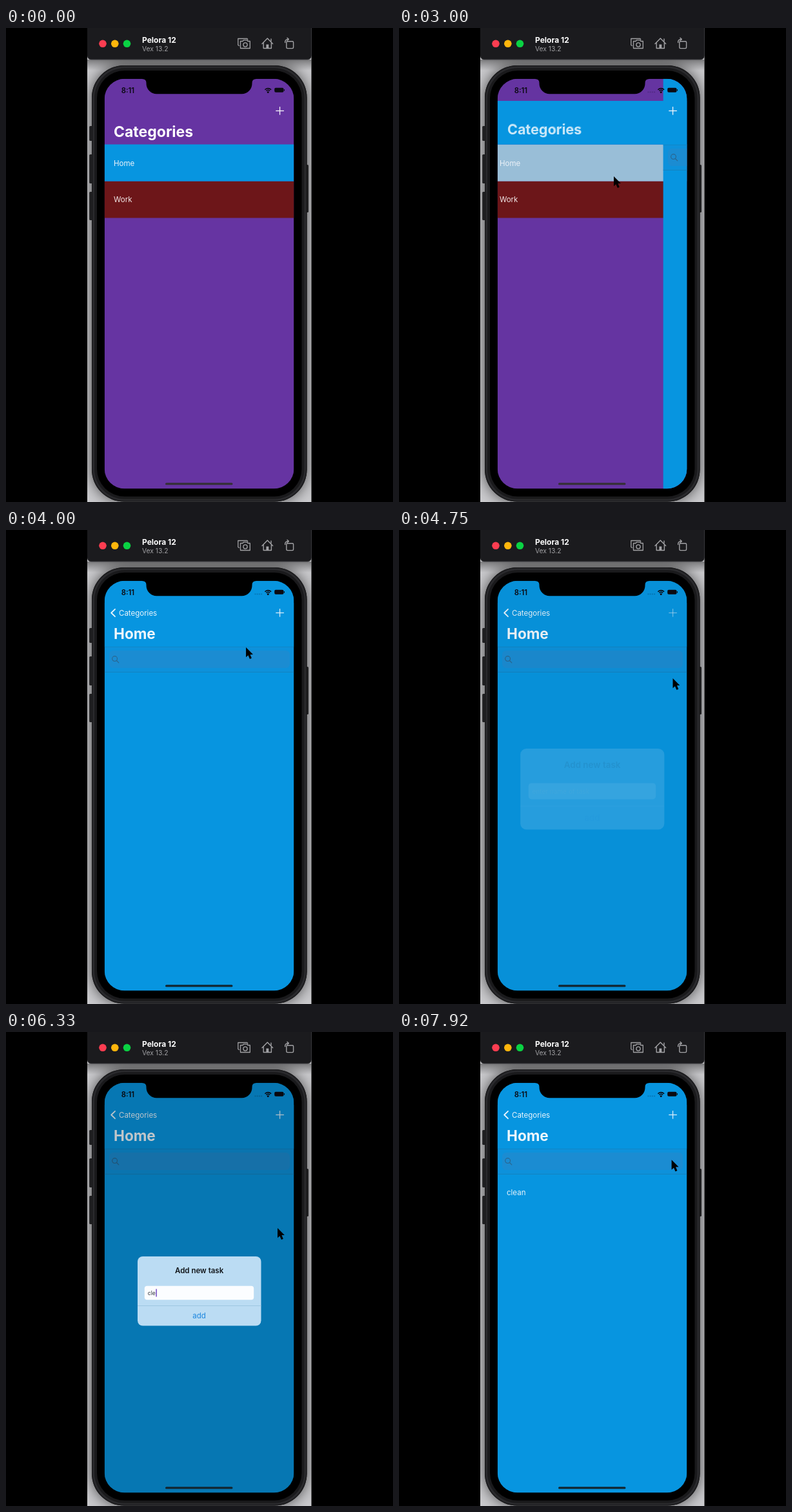
Write an HTML page with a canvas that moves like this. It is 600x735 px and loops after 8000 ms.

```html
<!DOCTYPE html>
<html lang="en">
<head>
<meta charset="utf-8">
<title>Task list demo</title>
<style>
html, body { margin: 0; width: 100%; height: 100%; overflow: hidden; background: #000; }
canvas { display: block; width: 600px; height: 735px; }
</style>
</head>
<body>
<canvas id="stage"></canvas>
<script>
const W = 600, H = 735, LOOP = 8000, STEP = 1000 / 12;
const SCREEN = { x: 152.7, y: 78.8, w: 293.7, h: 635.6, r: 31 };
const PURPLE = '#6634a2', BLUE = '#0795e0', MAROON = '#6d1619', ICON = '#a2a2a5';
const FONT = 'Inter, Roboto, sans-serif';

const canvas = document.getElementById('stage');
const ctx = canvas.getContext('2d');
const dpr = window.devicePixelRatio || 1;
canvas.width = W * dpr;
canvas.height = H * dpr;

// time, x, y of the pointer tip
const POINTER = [
  [1417, 310, 45], [1833, 342, 233], [2167, 434, 250], [2417, 434, 250],
  [2583, 385, 220], [2750, 333, 230], [3667, 333, 230], [4417, 421, 122],
  [4500, 421, 122], [4750, 424.5, 230], [5167, 421, 304], [7667, 421, 304],
  [7750, 430, 314], [7917, 422.6, 198]
];
const TYPING = [[5917, 'c'], [6333, 'cle'], [6500, 'clean']];

const clamp = v => Math.max(0, Math.min(1, v));
const mix = (a, b, p) => a + (b - a) * p;
const smooth = v => { v = clamp(v); return v * v * (3 - 2 * v); };

function box(x, y, w, h, r, fill) {
  ctx.beginPath();
  ctx.roundRect(x, y, w, h, r);
  ctx.fillStyle = fill;
  ctx.fill();
}

function rect(x, y, w, h, fill) {
  ctx.fillStyle = fill;
  ctx.fillRect(x, y, w, h);
}

function disc(x, y, r, fill) {
  ctx.beginPath();
  ctx.arc(x, y, r, 0, Math.PI * 2);
  ctx.fillStyle = fill;
  ctx.fill();
}

function text(str, x, y, size, weight, fill, align = 'left') {
  ctx.font = `${weight} ${size}px ${FONT}`;
  ctx.textAlign = align;
  ctx.fillStyle = fill;
  ctx.fillText(str, x, y);
}

function line(points, color, width, close = false) {
  ctx.beginPath();
  points.forEach(([x, y]) => ctx.lineTo(x, y));
  if (close) ctx.closePath();
  ctx.strokeStyle = color;
  ctx.lineWidth = width;
  ctx.stroke();
}

function faded(alpha, draw) {
  if (alpha <= 0) return;
  ctx.save();
  ctx.globalAlpha *= Math.min(1, alpha);
  draw();
  ctx.restore();
}

function toolbar() {
  box(126, -8, 347.5, 57.5, 6, '#47474a');
  box(126, -8, 347.5, 56.5, 6, '#1b1b1e');
  disc(150, 24.3, 5.8, '#fc3d51');
  disc(168.8, 24.3, 5.8, '#ffb60c');
  disc(187.5, 24.3, 5.8, '#0ad243');
  text('Pelora 12', 211, 22.5, 12, 700, '#fff');
  text('Vex 13.2', 211, 36, 10.3, 400, '#a0a0a3');

  ctx.lineJoin = ctx.lineCap = 'round';
  // screenshot
  line([[361.5, 27.5], [359.8, 26.5], [359.8, 16.5], [374, 16.5], [374.8, 18]], ICON, 1.3);
  line([[363.5, 20.5], [367, 20.5], [368.5, 18.8], [373.5, 18.8], [375, 20.5],
    [378.3, 20.5], [378.3, 31.5], [363.5, 31.5]], ICON, 1.3, true);
  ctx.beginPath();
  ctx.arc(371, 26, 3.1, 0, 7);
  ctx.stroke();
  // home
  line([[397, 24.5], [405.3, 16], [413.6, 24.5]], ICON, 1.4);
  line([[399.2, 23], [399.2, 31.5], [411.4, 31.5], [411.4, 23]], ICON, 1.4);
  line([[411, 20.5], [411, 17]], ICON, 1.4);
  rect(403.4, 25.5, 3.9, 6, ICON);
  // rotate
  ctx.beginPath();
  ctx.roundRect(434.8, 20.8, 10.8, 10.8, 1.5);
  ctx.stroke();
  ctx.beginPath();
  ctx.moveTo(432.6, 22.5);
  ctx.quadraticCurveTo(432.4, 17.4, 438, 17.4);
  ctx.stroke();
  line([[436, 15.2], [438.4, 17.4], [436, 19.6]], ICON, 1.3);
}

function phone() {
  rect(126, 0, 347.5, H, '#cbcbce');
  ctx.save();
  ctx.beginPath();
  ctx.rect(126, 0, 347.5, H);
  ctx.clip();
  ctx.shadowColor = 'rgba(0,0,0,.65)';
  ctx.shadowBlur = 22 * dpr;
  box(133, 58, 333.5, 676.5, 50, '#1c1c1e');
  ctx.restore();
  const shade = ctx.createLinearGradient(0, 49, 0, 66);
  shade.addColorStop(0, 'rgba(0,0,0,.4)');
  shade.addColorStop(1, 'rgba(0,0,0,0)');
  rect(126, 49, 347.5, 17, shade);

  [[152, 23], [196, 45], [254, 44]].forEach(([y, h]) => box(129.2, y, 6, h, 1.5, '#1f1f21'));
  box(464, 212, 5, 74, 1.5, '#1f1f21');
  box(133, 58, 333.5, 676.5, 50, '#1b1b1d');
  box(134.5, 59.5, 330.5, 673.5, 49, '#2a2a2d');
  box(137, 62, 325.5, 668.5, 47, '#1a1a1c');
  box(141, 66, 317.5, 660.5, 43, '#000');
}

function categories(shift, dim, picked) {
  const { x, y, w, h } = SCREEN;
  rect(x, y, w, h, PURPLE);
  rect(x, 180.5, w, 57.3, picked ? '#9abfd9' : BLUE);
  rect(x, 237.8, w, 56.7, MAROON);
  text('Home', 167 + shift, 213.5, 11.5, 400, '#eef4fa');
  text('Work', 167 + shift, 270.3, 11.5, 400, '#f2e8e8');
  if (dim) rect(x, y, w, h, `rgba(0,0,0,${dim})`);
}

function tasks(shift, done) {
  const { x, y, w, h } = SCREEN;
  ctx.save();
  ctx.translate(shift, 0);
  rect(x, y, w, h, BLUE);
  rect(x, 181, w, 39.5, 'rgba(40,130,195,.18)');
  box(160, 187, 280, 27, 6, 'rgba(60,130,190,.3)');
  rect(x, 180.7, w, 0.9, '#1681bd');
  rect(x, 219.9, w, 0.9, '#1681bd');
  ctx.beginPath();
  ctx.arc(168.6, 199.6, 3.9, 0, 7);
  ctx.strokeStyle = '#2a6690';
  ctx.lineWidth = 1.2;
  ctx.stroke();
  line([[171.5, 202.5], [174.8, 205.8]], '#2a6690', 1.2);
  if (done) text('clean', 167, 253.3, 11.5, 400, '#e9f4fb');
  ctx.restore();
}

// The large title shrinks into the label of the back button.
function navigation(p, shift, pressed) {
  if (p > 0) rect(SCREEN.x, 113, SCREEN.w, 67.7, BLUE);
  const scale = mix(122 / 58, 1, p);
  const x = mix(167, 175, p), y = mix(169.2, 132.6, p);
  faded(1 - p * 2, () => text('Categories', x, y, mix(23, 11, p), 700, '#fff'));
  faded(p * 2, () => text('Categories', x, y, 11.5 * scale, 400, '#eaf5fc'));
  if (p > 0) text('Home', 167 + shift * 1.1, 169.2, 22.6, 700, '#f0f7fc');
  faded((p - 0.9) * 10, () => line([[169, 122.8], [163.2, 128.5], [169, 134.2]], '#eaf5fc', 1.8));
  faded(pressed ? 0.5 : 1, () => {
    const ink = p > 0.5 ? '#d8ecf9' : '#f4f4fa';
    rect(418.3, 127.8, 12.6, 1.3, ink);
    rect(423.9, 122.1, 1.3, 12.6, ink);
  });
}

function statusBar(dots) {
  const ink = '#0b0a12';
  text('8:11', 178.7, 100.6, 11.3, 600, ink);
  if (dots) {
    for (let i = 0; i < 4; i++) rect(385.5 + i * 3.2, 98.6, 2, 1.6, 'rgba(10,10,30,.22)');
  }
  ctx.lineCap = 'butt';
  ctx.strokeStyle = ink;
  ctx.lineWidth = 1.6;
  [6.6, 3.9].forEach(r => {
    ctx.beginPath();
    ctx.arc(406.2, 100.2, r, -Math.PI * 0.76, -Math.PI * 0.24);
    ctx.stroke();
  });
  disc(406.2, 99.4, 1.5, ink);
  box(416.2, 92.8, 14.3, 7, 2, ink);
  rect(431, 95, 1, 2.6, ink);
}

// The contents fade a little behind the panel itself.
function dialog(alpha, scale, typed, caret) {
  faded(alpha, () => {
    ctx.translate(299.8, 401.7);
    ctx.scale(scale, scale);
    ctx.translate(-299.8, -401.7);
    box(204, 348, 191.5, 107.5, 8, '#bbdcf3');
    ctx.globalAlpha *= Math.sqrt(alpha);
    text('Add new task', 299.6, 373.6, 11.5, 600, '#101418', 'center');
    box(214.8, 393.8, 169.4, 21.4, 4, '#fbfdff');
    rect(204, 424, 191.5, 0.8, '#98c2de');
    text('add', 299.5, 444, 11.5, 400, '#1b86de', 'center');
    text(typed || 'enter name of task', 219.8, 407.8, 8.6, 400, typed ? '#30343a' : '#bcc0c6');
    if (caret) {
      const end = typed ? ctx.measureText(typed).width + 0.6 : 0;
      rect(219.8 + end, 398.5, 1.4, 12, '#6a3cc0');
    }
  });
}

function notch() {
  ctx.beginPath();
  ctx.moveTo(211, 78);
  ctx.lineTo(211, 79);
  ctx.quadraticCurveTo(217.5, 79, 217.5, 85);
  ctx.arcTo(217.5, 102.3, 236, 102.3, 16);
  ctx.arcTo(381.5, 102.3, 381.5, 86, 16);
  ctx.lineTo(381.5, 85);
  ctx.quadraticCurveTo(381.5, 79, 388, 79);
  ctx.lineTo(388, 78);
  ctx.fillStyle = '#000';
  ctx.fill();
}

function pointer(t) {
  if (t < 160) return;
  let i = POINTER.findIndex(k => k[0] > t);
  if (i < 0) i = POINTER.length;
  const a = POINTER[Math.max(0, i - 1)];
  const b = POINTER[Math.min(i, POINTER.length - 1)];
  const p = b[0] > a[0] ? clamp((t - a[0]) / (b[0] - a[0])) : 0;
  ctx.save();
  ctx.translate(mix(a[1], b[1], p), mix(a[2], b[2], p));
  ctx.beginPath();
  [[0, 0], [0, 15.3], [3.4, 12.2], [5.9, 18], [8.8, 16.7], [6.4, 11.1], [10.9, 11]]
    .forEach(([x, y]) => ctx.lineTo(x, y));
  ctx.closePath();
  ctx.fillStyle = '#000';
  ctx.fill();
  ctx.restore();
}

function render(t) {
  ctx.setTransform(dpr, 0, 0, dpr, 0, 0);
  rect(0, 0, W, H, '#000');
  phone();
  toolbar();

  const { x, y, w, h, r } = SCREEN;
  // critically damped spring for the page push
  const s = Math.max(0, (t - 2950) / 1000) * 12.2;
  const push = t > 3700 ? 1 : 1 - (1 + s) * Math.exp(-s);
  const shift = w * (1 - push);

  const open = smooth((t - 4645) / 400);
  const closing = t >= 6995;
  const fade = closing ? 0.36 * Math.pow(clamp(1 - (t - 7000) / 420), 2) : open;
  const typed = TYPING.reduce((str, [at, s]) => t >= at - 1 ? s : str, '');

  ctx.save();
  ctx.beginPath();
  ctx.roundRect(x, y, w, h, r);
  ctx.clip();
  if (push < 1) categories(-0.3 * w * push, 0.07 * push, t > 2910);
  if (push > 0) tasks(shift, t > 7320);
  navigation(push, shift, t > 4410 && t < 4800);
  statusBar(t > 820);
  if (fade > 0) {
    rect(x, y, w, h, `rgba(0,0,0,${0.2 * fade})`);
    dialog(fade, closing ? 1 : mix(1.2, 1, open), typed, !closing && open > 0.9);
  }
  box(247, 705.2, 104.5, 3.4, 1.7, push > 0.5 ? '#13252f' : '#353036');
  ctx.restore();

  notch();
  pointer(t);
}

const start = performance.now();
function tick(now) {
  const t = Math.max(0, now - start) % LOOP;
  render(Math.floor((t + 5) / STEP) % 96 * STEP);
  requestAnimationFrame(tick);
}
render(0);
requestAnimationFrame(tick);
</script>
</body>
</html>
```
